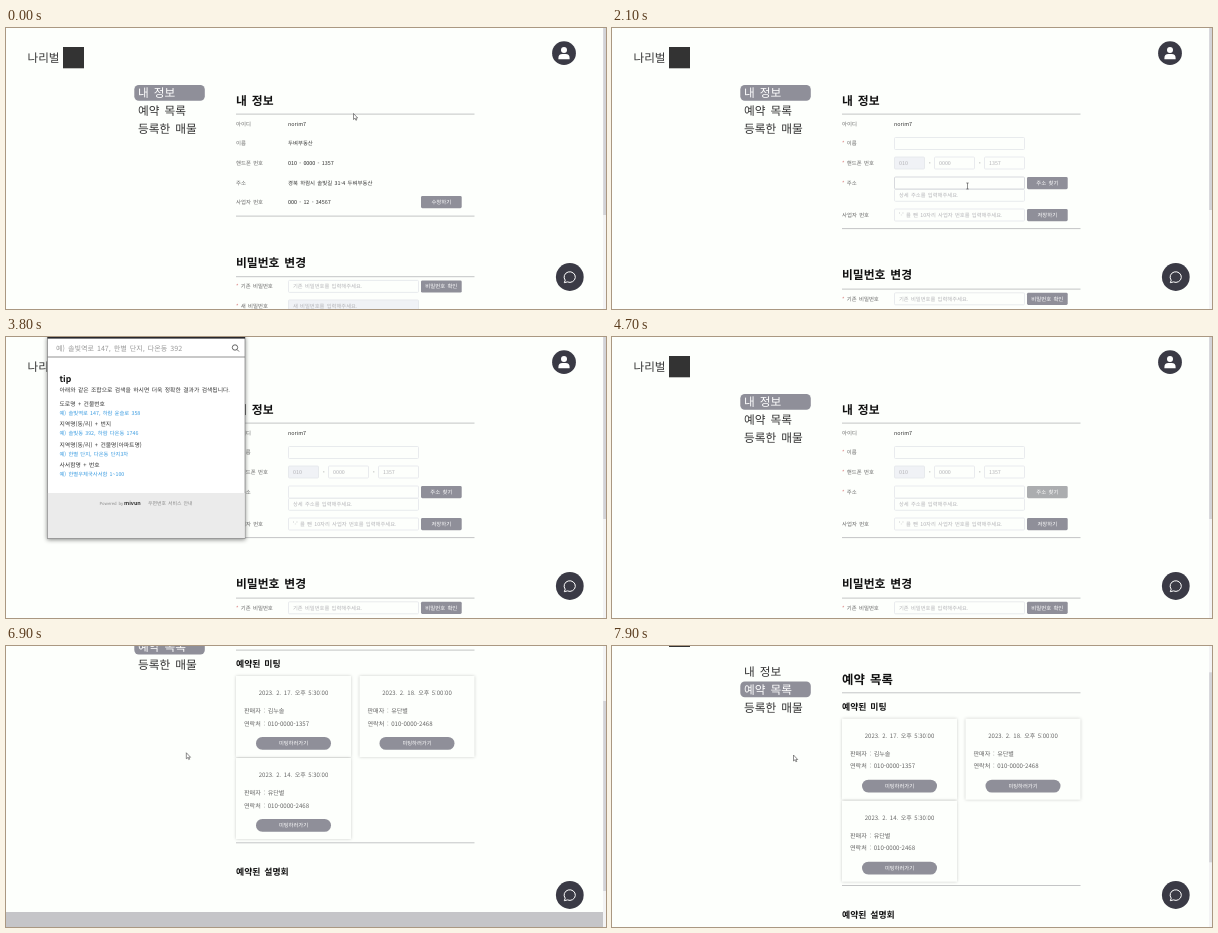
These frames come from a looping animation (600 by 281 pixels, 8000 ms). An HTML page:

```html
<!DOCTYPE html>
<html lang="ko">
<head>
<meta charset="utf-8">
<title>내 정보</title>
<style>
html, body { margin: 0; width: 100%; height: 100%; overflow: hidden; background: #fdfffc; }
svg { display: block; font-family: "Noto Sans CJK KR", "Noto Sans CJK", "Noto Sans", sans-serif; }
text { word-spacing: .14em; text-rendering: geometricPrecision; }
.card { fill: #fdfffc; filter: drop-shadow(0 0 1.5px #0003); }
.window { filter: drop-shadow(0 1px 2px #0007); }
</style>
</head>
<body>
<svg id="stage" width="600" height="281" viewBox="0 0 600 281"></svg>
<script>
const LOOP = 8000;
const GRAY = '#8f8f99', DARK = '#3a3a45', INK = '#333', TEXT = '#666', HINT = '#b4b4b8', BLUE = '#3a9be0';
const PAPER = '#fdfffc', EDGE = '#e4e6ea';

// y is the vertical middle of the text
const text = (s, x, y, size = 5.4, fill = TEXT, extra = '') =>
  `<text x="${x}" y="${y + size * .37}" font-size="${size}" fill="${fill}" ${extra}>${s}</text>`;
const bold = (s, x, y, size, fill = '#111') => text(s, x, y, size, fill, 'font-weight="700"');
const mid = (s, x, y, size, fill) => text(s, x, y, size, fill, 'text-anchor="middle"');
const rect = (x, y, w, h, fill, rx = 0, extra = '') =>
  `<rect x="${x}" y="${y}" width="${w}" height="${h}" rx="${rx}" fill="${fill}" ${extra}/>`;
const group = (id, body) => `<g id="${id}">${body}</g>`;
const rule = y => rect(230, y - .4, 238.5, 1, '#c4c5c6');
const must = (s, y) => text(`<tspan fill="#d87878">*</tspan> ${s}`, 230, y);
const field = (x, y, w, hint, off, id = '') =>
  rect(x + .5, y - 6, w - 1, 12, off ? '#f0f2f6' : PAPER, 1, `stroke="${EDGE}" stroke-width=".8" id="${id}"`) +
  text(hint, x + 5, y, 5.3, HINT);
const button = (s, y, id = '') => rect(415, y - 6, 40.7, 12.2, GRAY, 1.4, `id="${id}"`) + mid(s, 435.3, y, 5.4, '#fff');

const password = y => bold('비밀번호 변경', 230, y, 11.8) + rule(y + 14.2) +
  must('기존 비밀번호', y + 24) + field(282, y + 24, 131, '기존 비밀번호를 입력해주세요.') + button('비밀번호 확인', y + 24) +
  must('새 비밀번호', y + 43.5) + field(282, y + 43.5, 131, '새 비밀번호를 입력해주세요.', true);

const profileTop = bold('내 정보', 230, 72.5, 11.8) + rule(86) + text('아이디', 230, 96) + text('norim7', 282, 96, 5.4, INK);

const profile = profileTop +
  [['이름', '두벼부동산', 115.5], ['핸드폰 번호', '010 - 0000 - 1357', 135],
   ['주소', '경북 하람시 솔빛길 31-4 두벼부동산', 155], ['사업자 번호', '000 - 12 - 34567', 174]]
    .map(([k, v, y]) => text(k, 230, y) + text(v, 282, y, 5.4, INK)).join('') +
  button('수정하기', 174) + rule(188) + password(234.4);

const form = profileTop +
  must('이름', 115.5) + field(282, 115.5, 131, '') +
  must('핸드폰 번호', 135) + field(282, 135, 31, '010', true) + mid('-', 317.7, 135) +
  field(322, 135, 41, '0000') + mid('-', 367.7, 135) + field(372, 135, 41, '1357') +
  must('주소', 155) + field(282, 167.3, 131, '상세 주소를 입력해주세요.') + field(282, 155, 131, '', false, 'address') +
  button('주소 찾기', 155, 'find') +
  text('사업자 번호', 230, 187) + field(282, 187, 131, "'-' 를 뺀 10자리 사업자 번호를 입력해주세요.") +
  button('저장하기', 187) + rule(200.5) + password(246.8);

const card = (x, y, when, who, phone) => `<g transform="translate(${x} ${y})">` +
  '<rect class="card" width="115" height="81"/>' +
  mid(when, 57.5, 17, 6, TEXT) + text('판매자 : ' + who, 8, 35, 6.1) + text('연락처 : ' + phone, 8, 47.5, 6.1) +
  rect(20, 61, 75, 12.8, GRAY, 6.4) + mid('미팅하러가기', 57.5, 67.4, 5.3, '#fff') + '</g>';

const booking = bold('예약 목록', 230, 72.3, 12.4) + rule(86) + bold('예약된 미팅', 230, 99.7, 8.9) +
  group('cards',
    card(230, 112, '2023. 2. 17. 오후 5:30:00', '김누솔', '010-0000-1357') +
    card(353.5, 112, '2023. 2. 18. 오후 5:00:00', '유단별', '010-0000-2468') +
    card(230, 194, '2023. 2. 14. 오후 5:30:00', '유단별', '010-0000-2468')) +
  rule(278.7) + bold('예약된 설명회', 230, 307.9, 8.9) + rect(0, 348, 597, 80, '#c5c5c8');

const header = text('나리벌', 21.5, 30, 11.6, INK) + rect(57, 19, 21, 21.3, '#333') +
  `<circle cx="558" cy="25.2" r="11.9" fill="${DARK}"/><circle cx="558" cy="22" r="3" fill="#fff"/>` +
  '<path d="M552.4 31.2v-1.2q0-4 4-4h3.2q4 0 4 4v1.2z" fill="#fff"/>';

const tabs = ['내 정보', '예약 목록', '등록한 매물'].map((s, i) => text(s, 132, 65 + i * 17.8, 11.7, INK, 'class="tab"')).join('');

const chat = `<circle cx="563.8" cy="249" r="13.9" fill="${DARK}"/>` +
  '<path d="M559.2 252.2a5.6 5.3 0 1 1 2.2 1.7l-3.1.8z" fill="none" stroke="#fff" stroke-width="1" stroke-linejoin="round"/>';

const tips = [['도로명 + 건물번호', '솔빛역로 147, 하람 윤슬로 358'], ['지역명(동/리) + 번지', '솔빛동 392, 하람 다온동 1746'],
  ['지역명(동/리) + 건물명(아파트명)', '한별 단지, 다온동 단지3차'], ['사서함명 + 번호', '한별우체국사서함 1~100']];
const popup = '<g class="window">' + rect(41.5, 0, 197.5, 201.5, '#fff', 0, 'stroke="#8c8c8c" stroke-width=".8"') + '</g>' +
  rect(41.5, 0, 197.5, 1.6, '#26262b') +
  group('tips',
    text('예) 솔빛역로 147, 한별 단지, 다온동 392', 50, 11, 7.1, '#999') +
    '<g fill="none" stroke="#555" stroke-width=".9"><circle cx="229" cy="10.5" r="2.7"/><path d="M231 12.5l2 2"/></g>' +
    rect(41.5, 19.6, 197.5, .8, '#777') + bold('tip', 53.5, 42, 8.6) +
    text('아래와 같은 조합으로 검색을 하시면 더욱 정확한 결과가 검색됩니다.', 53.5, 53, 5.8, INK) +
    tips.map(([k, v], i) => text(k, 53.5, 67 + i * 20.3, 5.8, INK) + text('예) ' + v, 53.5, 76 + i * 20.5, 5.3, BLUE)).join('') +
    rect(41.9, 156, 196.7, 45, '#ebebeb') + text('Powered by', 93.5, 166.5, 4.2, '#888') +
    bold('mivun', 118, 166.5, 5.4, '#333') + text('우편번호 서비스 안내', 142, 166.5, 4.9, '#888')) +
  group('caret', rect(47.5, 6, .8, 9, '#333'));

const status = rect(-3, 273, 203, 11, '#55565a', 2) + text('i8d108.p.ssafy.io에 응답을 기다리는 중...', 2, 277.3, 4.9, '#fff');

const shapes = {
  arrow: 'M0 0v6l1.4-1.2 1 2 .9-.4-1-1.9h1.9z',
  hand: 'M1.5 0q.8 0 .8 .8v2.4l3 .8q.6 .4 .4 1.4l-.7 3h-3l-1.9-2.9.6-.5.6.5v-4.7q0-.8.8-.8z',
  beam: 'M-1.2-3h2.4M0-3v6M-1.2 3h2.4'
};

const $ = id => document.getElementById(id);
$('stage').innerHTML =
  group('page', header + rect(128.3, 57, 70.5, 15.8, GRAY, 4.5, 'id="active"') + tabs +
    group('profile', profile) + group('form', form) + group('booking', booking)) +
  rect(597, 0, 3, 281, '#f3f3f4') + rect(597.2, 0, 2.8, 188, '#d3d3d7', 0, 'id="thumb"') +
  chat + group('popup', popup) + group('status', status) +
  '<path id="cursor" fill="#fff" stroke="#444" stroke-width=".6" stroke-linejoin="round"/>';

// rows of [time, ...values], linear in between
function track(rows, t) {
  const i = rows.findIndex(r => r[0] > t);
  if (i < 0) return rows.at(-1).slice(1);
  if (i === 0) return rows[0].slice(1);
  const a = rows[i - 1], b = rows[i], k = (t - a[0]) / (b[0] - a[0]);
  return a.slice(1).map((v, j) => v + (b[j + 1] - v) * k);
}
const pointer = [[0, 347.5, 85.5], [300, 385, 115], [700, 434, 174], [1000, 434, 174], [1400, 365, 122], [1800, 350, 150],
  [2100, 355.5, 158], [2200, 358, 157], [2500, 434, 156], [2800, 434, 156], [3400, 236, 6],
  [5100, 226, 22], [5200, 222, 90], [5300, 205, 146], [5400, 167, 82], [5500, 164.5, 80.5],
  [6400, 164.5, 80.5], [7000, 183.5, 112], [7500, 183.5, 112], [7900, 181.5, 109]];
const scrolling = [[6400, 0], [6500, 8], [6600, 30], [6700, 52], [6800, 70], [6900, 82], [7000, 90], [7100, 94],
  [7200, 94], [7300, 88], [7400, 72], [7500, 63], [7600, 63], [7700, 58], [7800, 48], [7900, 39.3]];
const statusFade = [[5900, 0], [6100, 1], [6300, 1], [6400, .6], [6500, 0]];

const show = (id, on) => $(id).style.display = on ? '' : 'none';
const within = (t, a, b) => t >= a && t < b;

function draw(t) {
  const editing = within(t, 800, 5900), listing = t >= 5900;
  show('profile', t < 800);
  show('form', editing);
  show('booking', listing);
  show('cards', t >= 6000);
  $('active').setAttribute('y', listing ? 74.7 : 57);
  document.querySelectorAll('.tab').forEach((tab, i) => tab.setAttribute('fill', i === +listing ? '#fff' : INK));

  const [scroll] = track(scrolling, t);
  $('page').setAttribute('transform', `translate(0 ${-scroll})`);
  $('thumb').setAttribute('y', scroll * .67);
  $('thumb').setAttribute('height', listing ? 190 : editing ? 182 : 187);

  $('address').setAttribute('stroke', within(t, 1800, 2300) ? '#cdd0d5' : EDGE);
  $('find').setAttribute('fill', t >= 4500 ? '#abadaf' : GRAY);

  const moving = t < 2800 || t >= 4400;
  show('popup', within(t, 2700, 4500));
  $('popup').setAttribute('opacity', moving ? .6 : 1);
  $('popup').setAttribute('transform', moving ? 'translate(140 100) scale(.97) translate(-140 -100)' : '');
  show('tips', t >= 3100);
  show('caret', within(t, 3300, 3800));
  $('status').setAttribute('opacity', track(statusFade, t)[0]);

  const [x, y] = track(pointer, t);
  const kind = within(t, 700, 1100) || within(t, 2400, 2900) || within(t, 5600, 6500) ? 'hand'
    : within(t, 1800, 2400) ? 'beam' : 'arrow';
  show('cursor', !within(t, 3400, 5100));
  $('cursor').setAttribute('d', shapes[kind]);
  $('cursor').setAttribute('transform', `translate(${x} ${y})`);
}

const start = performance.now();
function tick() {
  draw(Math.floor((performance.now() - start) % LOOP / 100) * 100);
  requestAnimationFrame(tick);
}
tick();
</script>
</body>
</html>
```
